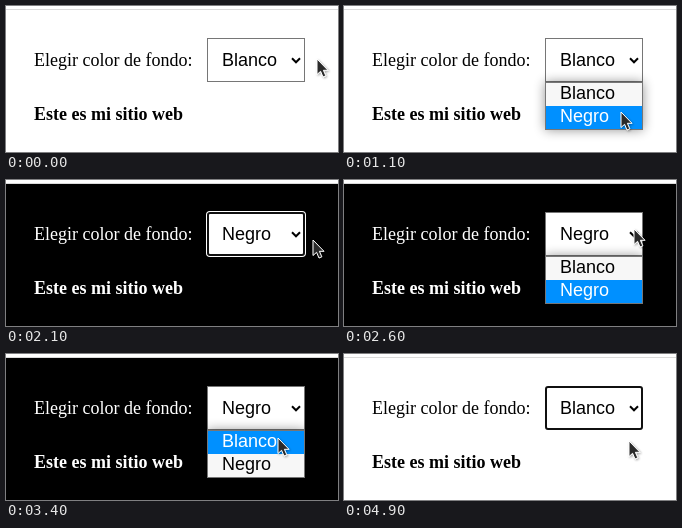
An HTML page for the animation above (5 s loop, 332 by 146 pixels).

```html
<!DOCTYPE html>
<html lang="es">
<head>
<meta charset="utf-8">
<style>
  html, body { margin: 0; width: 100%; height: 100%; overflow: hidden; background: #fff; }
  svg { display: block; }
  text { font-size: 18px; }
  .serif { font-family: "Liberation Serif", "Times New Roman", serif; }
  .sans { font-family: "Liberation Sans", Arial, sans-serif; }
</style>
</head>
<body>
<svg width="332" height="146" viewBox="0 0 332 146">
  <defs>
    <filter id="soft" x="-50%" y="-80%" width="200%" height="260%"><feGaussianBlur stdDeviation="6"/></filter>
    <filter id="drop" x="-50%" y="-50%" width="200%" height="200%">
      <feDropShadow dx="1" dy="1" stdDeviation="1" flood-opacity=".35"/>
    </filter>
  </defs>
  <rect width="332" height="146" fill="#fff"/>
  <rect y="3" width="332" height="1" fill="#dadada"/>
  <rect id="page" y="4" width="332" height="142"/>
  <g id="copy" class="serif">
    <text x="28" y="60">Elegir color de fondo:</text>
    <text x="28" y="114" font-weight="bold">Este es mi sitio web</text>
  </g>

  <g id="ring">
    <rect x="200" y="31" width="100" height="46" rx="4" fill="#fff"/>
    <rect x="202" y="33" width="96" height="42" rx="2" fill="#fff" stroke="#101010" stroke-width="2"/>
  </g>
  <rect id="box" x="201.5" y="32.5" width="97" height="43" fill="#fff" stroke="#767676"/>
  <text id="value" class="sans" x="216" y="60"></text>
  <path d="M286 52.3l4 4 4-4" fill="none" stroke="#000" stroke-width="2"/>

  <g id="popup" class="sans">
    <rect x="201" y="76" width="98" height="48" opacity=".42" filter="url(#soft)"/>
    <rect x="201.5" y="76.5" width="97" height="47" fill="#f7f7f7" stroke="#767676"/>
    <rect id="highlight" x="202" width="96" height="23" fill="#0090ff"/>
    <text id="white" x="216" y="93">Blanco</text>
    <text id="black" x="216" y="116">Negro</text>
  </g>

  <path id="cursor" d="M0 0V15.5L3.6 12.3 6 18 8.8 16.8 6.4 11.3H11Z" fill="#2b2b2b"
        stroke="#fff" stroke-width="1" stroke-linejoin="round" filter="url(#drop)"/>
</svg>
<script>
const LOOP = 5000, STEP = 100;
const el = id => document.getElementById(id);
const show = (id, on) => el(id).setAttribute("visibility", on ? "visible" : "hidden");
const fill = (id, color) => el(id).setAttribute("fill", color);
const within = (t, from, to) => t >= from && t < to;

// time, x, y of the pointer tip
const path = [
  [0, 311, 53], [400, 286, 50], [600, 286, 50], [1100, 277, 106],
  [1600, 277, 106], [2200, 309, 56], [2300, 295, 52], [2400, 295, 52],
  [2500, 290, 49], [2700, 290, 49], [3300, 268, 83], [3400, 272, 84],
  [4800, 272, 84], [4900, 285, 87], [LOOP, 285, 87]
];

function pointerAt(t) {
  const i = path.findIndex(key => key[0] > t);
  const [t0, x0, y0] = path[i - 1], [t1, x1, y1] = path[i];
  const p = (t - t0) / (t1 - t0), e = p * p * (3 - 2 * p);
  return [x0 + (x1 - x0) * e, y0 + (y1 - y0) * e];
}

function draw(time) {
  const t = Math.floor(time % LOOP / STEP) * STEP;
  const [x, y] = pointerAt(t);
  const dark = within(t, 1400, 4300);
  const open = within(t, 500, 1400) || within(t, 2600, 4300);
  const focused = t >= 1400 && !open;
  const onBlack = dark ? y < 77 : y >= 100;

  fill("page", dark ? "#000" : "#fff");
  fill("copy", dark ? "#fff" : "#000");
  el("value").textContent = dark ? "Negro" : "Blanco";
  show("ring", focused);
  show("box", !focused);
  show("popup", open);
  el("highlight").setAttribute("y", onBlack ? 100 : 77);
  fill("white", onBlack ? "#000" : "#fff");
  fill("black", onBlack ? "#fff" : "#000");
  el("cursor").setAttribute("transform", `translate(${Math.round(x)} ${Math.round(y)})`);
}

const start = performance.now();
function tick() {
  draw(performance.now() - start);
  requestAnimationFrame(tick);
}
tick();
</script>
</body>
</html>
```
